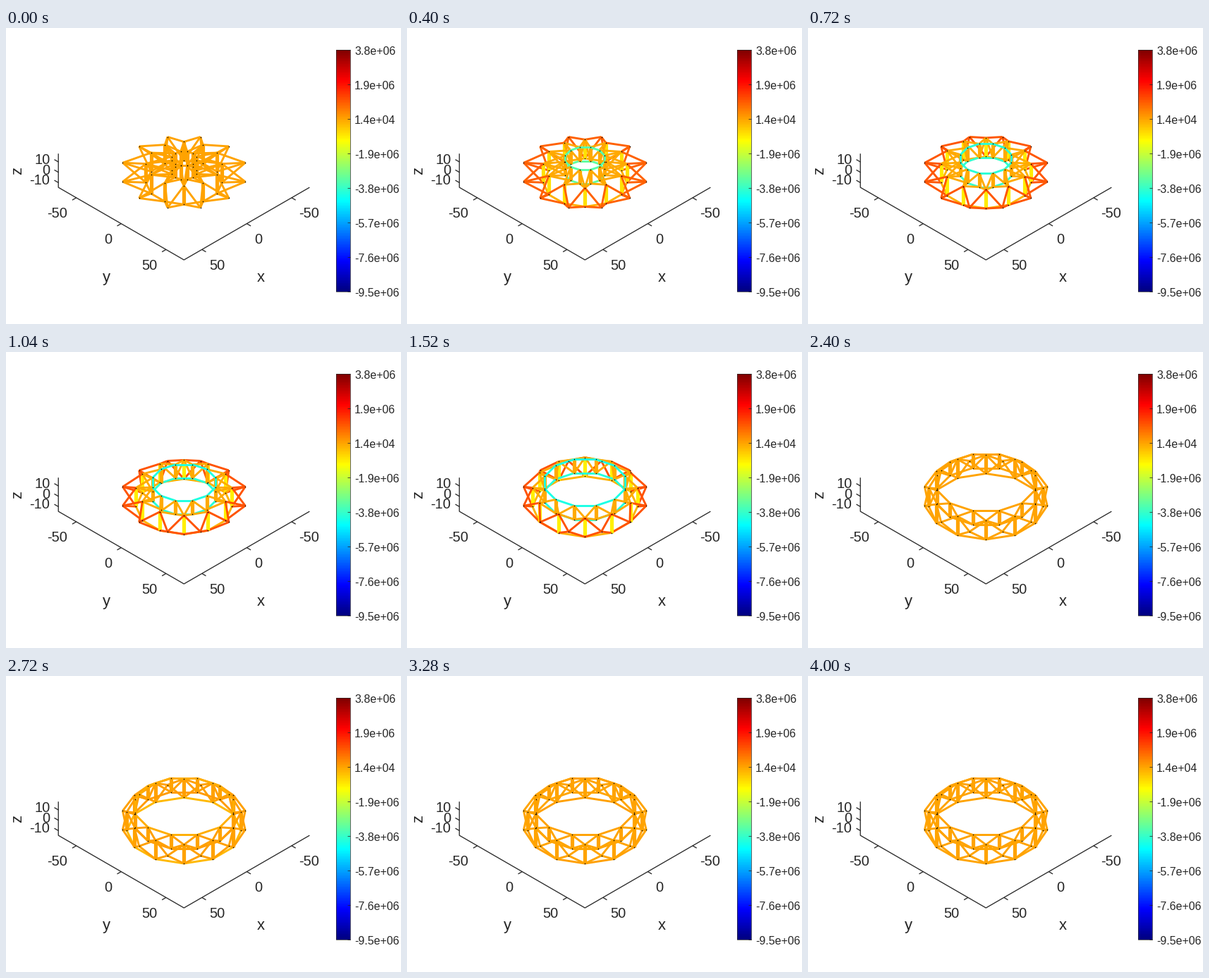
Recreate the animation shown at these times as a matplotlib script. Size 560 by 420 pixels, loop 4080 ms.

```python
import numpy as np
import matplotlib.pyplot as plt
from matplotlib.animation import FuncAnimation
from matplotlib.collections import LineCollection

W, H, DPI = 560, 420, 100
PX = 72 / DPI                    # points per pixel
FRAMES, INTERVAL = 51, 80
DEPLOY = 25                      # steps until the ring is fully open
N = 12
INK = "#262626"
ZMIN, ZMAX, LIM = -14.6, 18.0, 70
REST = .715                      # colour level of an unstressed member
CABLE, BAR = 2.9, 5.2            # line widths in pixels

# group: level while opening, level just after locking
STRESS = {
    "outer": (.795, .690), "hoop": (.700, .870), "inner": (.708, .685),
    "top": (.400, .790), "bottom": (.410, .655),
    "mid_bar": (.640, .708), "in_bar": (.708, .712),
}


def jet(u):
    u = np.asarray(u, float)
    rgb = [np.minimum(4 * u - a, b - 4 * u)
           for a, b in ((1.5, 4.5), (.5, 3.5), (-.5, 2.5))]
    return np.clip(np.stack(rgb, -1), 0, 1)


def level(group, i):
    """Stress builds up while opening, then rings out once locked."""
    opening, locked = STRESS[group]
    if i <= DEPLOY:
        return REST + (opening - REST) * (1 - np.exp(-i / 3))
    n = i - DEPLOY - 1
    return REST + (locked - REST) * np.exp(-n / 4) * np.cos(np.pi * n / 8)


def project(p):
    """Isometric view along (1, 1, 1) to pixel coordinates."""
    x, y, z = np.moveaxis(np.asarray(p, float), -1, 0)
    return np.stack([252.3 + 1.272 * (y - x),
                     204.7 + .7348 * (x + y) - 1.47 * z], -1)


def ring(r, z, shift):
    a = np.radians(30 * np.arange(N) + shift)
    return np.stack([r * np.cos(a), r * np.sin(a), np.full(N, z)], -1)


def nodes(i):
    r = 10 + 30 * min(i / DEPLOY, 1)
    mid = (r + 50) / 2
    return {
        "o": ring(50, 0, 0),
        "mt": ring(mid, 8.2, 15), "mb": ring(mid, -9.9, 15),
        "it": ring(r, 13.2, 0), "ib": ring(r, 0, 0),
    }


def members(i):
    p = nodes(i)
    out = []

    def link(a, b, group, shift=0, width=CABLE):
        u = level(group, i)
        for s, e in zip(p[a], np.roll(p[b], shift, axis=0)):
            out.append((s, e, u, width))

    for s in (0, 1):
        link("o", "mt", "outer", s)
        link("o", "mb", "outer", s)
        link("it", "mt", "inner", s)
        link("ib", "mt", "inner", s)
    link("mb", "mb", "hoop", 1)
    link("it", "it", "top", 1)
    link("ib", "ib", "bottom", 1)
    link("mt", "mb", "mid_bar", 0, BAR)
    link("it", "ib", "in_bar", 0, BAR)
    out.sort(key=lambda m: np.sum(m[0] + m[1]))
    return out, np.concatenate(list(p.values()))


plt.rcParams["font.family"] = "Liberation Sans"
fig = plt.figure(figsize=(W / DPI, H / DPI), dpi=DPI, facecolor="white")
ax = fig.add_axes([0, 0, 1, 1])
ax.axis("off")


def line(*pts, lw=1.3):
    x, y = np.array(pts).T
    ax.plot(x, y, color=INK, lw=lw * PX, solid_capstyle="butt", zorder=2)


def label(x, y, s, size=20, ha="center"):
    ax.text(x, y, s, fontsize=size * PX, color=INK, ha=ha,
            va="center_baseline")


# axes of the 3-D box
line(*project([(-LIM, LIM, ZMIN), (LIM, LIM, ZMIN),
               (LIM, -LIM, ZMIN), (LIM, -LIM, ZMAX)]))
OUT = LIM + 4.5
for v in (50, 0, -50):
    xt = project([(v, LIM, ZMIN), (v, OUT, ZMIN)])
    yt = project([(LIM, v, ZMIN), (OUT, v, ZMIN)])
    line(*xt)
    line(*yt)
    label(xt[0, 0] + 10.5, xt[0, 1] + 21, str(v), ha="left")
    label(yt[0, 0] - 12.5, yt[0, 1] + 21, str(v), ha="right")
for v in (10, 0, -10):
    zt = project([(LIM, -LIM, v), (LIM, -OUT, v)])
    line(*zt)
    label(62.5, zt[0, 1] - 4.5, str(v), ha="right")
label(361, 352, "x", 22)
label(142, 352, "y", 22)
ax.text(16.5, 202, "z", fontsize=22 * PX, color=INK, rotation=90,
        ha="center", va="center")

# colour bar
LEFT, RIGHT, TOP, BOTTOM = 467.5, 487.5, 31, 374
ax.imshow(jet(np.linspace(1, 0, 256))[:, None],
          extent=(LEFT, RIGHT, BOTTOM, TOP),
          aspect="auto", interpolation="nearest", zorder=1)
line((LEFT, TOP), (RIGHT, TOP), (RIGHT, BOTTOM), (LEFT, BOTTOM),
     (LEFT, TOP), lw=.7)
for k, v in enumerate(np.linspace(3.8e6, -9.5e6, 8)):
    y = TOP + 49 * k
    line((RIGHT - 3.5, y), (RIGHT, y), lw=.8)
    text = "1.4e+04" if k == 2 else f"{v:.1e}"
    label(494, y + 1, text, 16, "left")
ax.set_xlim(0, W)
ax.set_ylim(H, 0)

truss = LineCollection([], zorder=3, capstyle="butt")
ax.add_collection(truss)
joints, = ax.plot([], [], "s", ms=1.4 * PX, mew=0, color="black", zorder=4)


def draw(i):
    parts, pts = members(i)
    truss.set_segments([project([s, e]) for s, e, _, _ in parts])
    truss.set_color(jet([m[2] for m in parts]))
    truss.set_linewidth([m[3] * PX for m in parts])
    joints.set_data(*project(pts).T)
    return truss, joints


anim = FuncAnimation(fig, draw, frames=FRAMES, interval=INTERVAL,
                     init_func=lambda: draw(0), repeat=True, repeat_delay=0)
plt.show()
```
